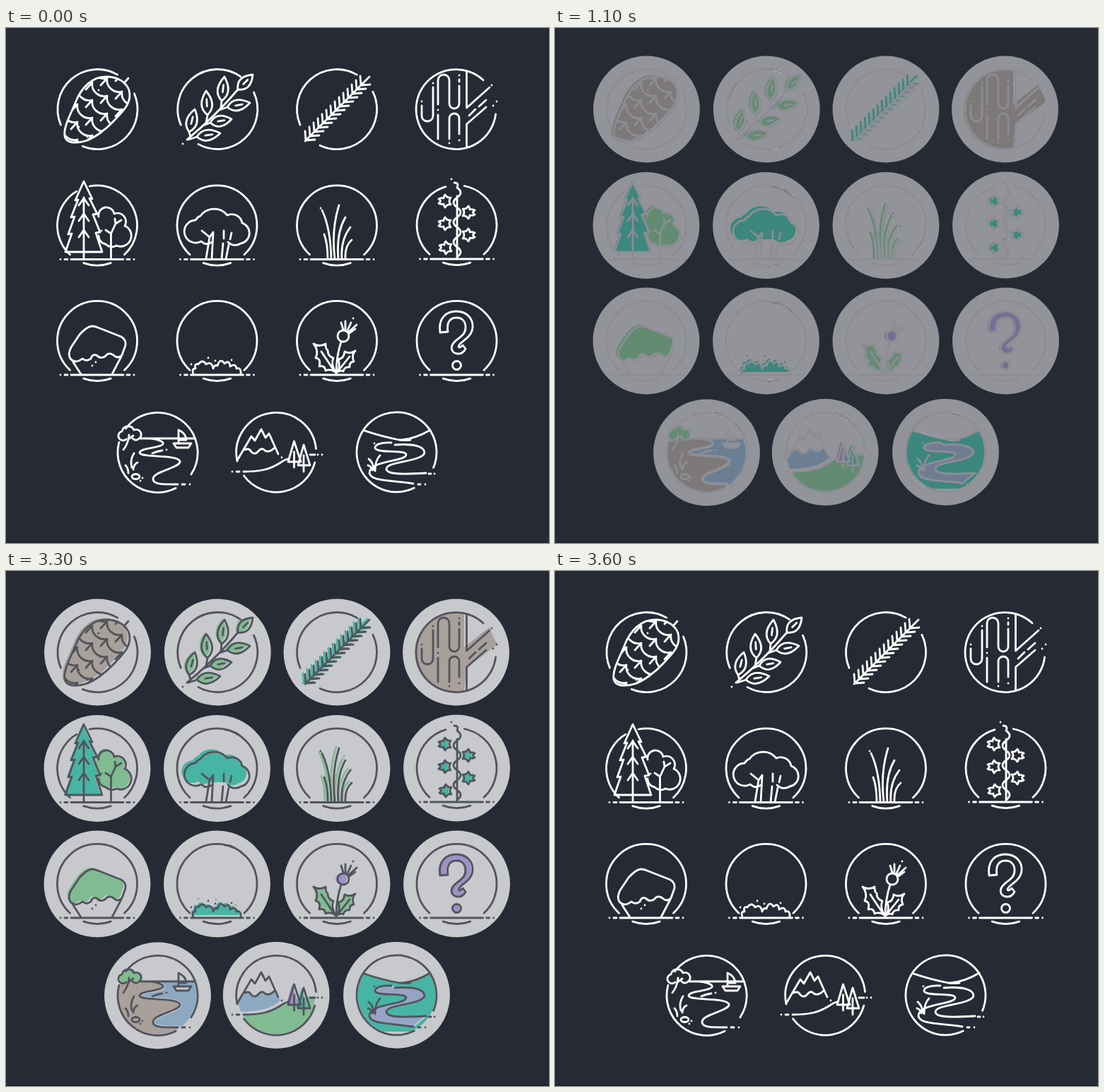
An HTML page that plays this animation: 768x729 px, repeating every 4.6 s.

```html
<!DOCTYPE html>
<html lang="en">
<head>
<meta charset="utf-8">
<title>Nature icons</title>
<style>
html, body { margin: 0; width: 100%; height: 100%; overflow: hidden; background: #262a34; }
svg { display: block; width: 100vw; height: 100vh; }
.ink { fill: none; stroke-width: 2.8; stroke-linecap: round; stroke-linejoin: round; }
</style>
</head>
<body>
<svg id="stage" viewBox="0 0 768 729"></svg>
<script>
const TEAL = '#53e4c8', GREEN = '#a0ecb0', BROWN = '#d4c8bc', PURPLE = '#c8b5f3',
      BLUE = '#b0d3f0', RIVER = '#bccff3', WHITE = '#fff', DARK = '#191b27', NIGHT = '#262a34';
const R = 56.5, DISC = 75.4;

let ink = '', paint = '', discs = '', defs = '';

const line = (d, extra = '') => { ink += `<path d="${d}" ${extra}/>`; };
const fill = (color, d, x = -3, y = -2, extra = '') => {
  paint += `<path fill="${color}" d="${d}" transform="translate(${x} ${y})" ${extra}/>`;
};
const tint = (color, d, x = -4, y = -2) => {
  paint += `<path class="ink" stroke="${color}" d="${d}" transform="translate(${x} ${y})"/>`;
};
const dots = (...points) => points.map(([x, y]) => `M${x} ${y}h0`).join('');
const round = (x, y, r) => `M${x - r} ${y}a${r} ${r} 0 1 1 ${2 * r} 0a${r} ${r} 0 1 1 ${-2 * r} 0Z`;
const clip = (id, d) => {
  defs += `<clipPath id="${id}"><path d="${d}"/></clipPath>`;
  return `clip-path="url(#${id})"`;
};

// A disc with an inner ring made of arcs given in degrees, clockwise from the right.
function badge(x, y, ...arcs) {
  discs += `<circle cx="${x}" cy="${y}" r="${DISC}"/>`;
  const at = a => {
    const t = a * Math.PI / 180;
    return `${(x + R * Math.cos(t)).toFixed(1)} ${(y + R * Math.sin(t)).toFixed(1)}`;
  };
  for (const [a, b] of arcs) line(`M${at(a)}A${R} ${R} 0 ${b - a > 180 ? 1 : 0} 1 ${at(b)}`);
}

function grounded(x, y, ...arcs) {
  badge(x, y, ...(arcs.length ? arcs : [[133, 407]]), [70, 110]);
  line(`M${x - 37} ${y + 48}h74M${x - 46} ${y + 48}h4M${x + 42} ${y + 48}h4` +
    dots([x - 52, y + 48], [x + 52, y + 48]));
}

function cone() {
  badge(129.5, 115, [157, 300], [337, 472]);
  const body = 'M83 153C81 140 92 121 98 106C106 85 122 67 145 69C158 70 170 76 174 88' +
    'C179 106 165 118 153 131C142 143 125 156 112 160C98 164 85 163 83 153Z';
  let scales = '';
  for (let i = -1; i < 6; i++)
    for (let j = -2; j < 5; j++)
      scales += `M${164 - 21 * i} ${90 + 6 * i + 25 * j}l-9 10m9 -10a17 17 0 0 0 21 19`;
  fill(BROWN, body);
  line(body);
  line(scales, clip('cone', body));
  line('M167 78L173 71' + dots([103, 140], [115, 154], [131, 88]));
}

function branch() {
  badge(299.3, 115, [157, 305], [335, 479]);
  const leaves = [[328, 87, 349, 66], [305, 103, 309, 69], [285, 123, 283, 89], [259, 147, 267, 115],
    [313, 112, 345, 106], [289, 134, 319, 129], [270, 154, 303, 149]];
  for (const [x, y, u, v] of leaves) {
    const dx = u - x, dy = v - y, k = 15 / Math.hypot(dx, dy), nx = -dy * k, ny = dx * k;
    const side = s => `${x + dx * .38 + s * nx} ${y + dy * .38 + s * ny}`;
    const leaf = `M${x} ${y}Q${side(1)} ${u} ${v}Q${side(-1)} ${x} ${y}Z`;
    fill(GREEN, leaf, -3, -1);
    line(`${leaf}M${x + dx * .36} ${y + dy * .36}l${dx * .3} ${dy * .3}`);
  }
  line('M256 158C280 138 307 112 328 87M305 103L304 113M285 123L283 134M259 147L261 154' +
    'M313 112L302 116M289 134L279 138M270 154L258 158' + dots([250, 164]));
}

function twig() {
  badge(468, 115, [157, 300], [334, 475]);
  let needles = 'M423 160L514 69';
  for (let i = 0; i < 14; i++)
    needles += `M${424 + 6 * i} ${159 - 6 * i}l-1 -13m1 13l13 -1`;
  tint(TEAL, needles, -3, -1);
  line(needles);
}

function bark() {
  badge(636.5, 115, [7, 313]);
  fill(BROWN, 'M648 60V108L683 80L695 104L651 137L648 171A57 57 0 1 1 648 60Z', 0, 0);
  line('M651.5 61V113L684 84M651.5 168V136L679 112M655 124L664 115M669 111L679 102' +
    'M588 110V124a8 8 0 0 0 16 0V84M611 108V74a8 8 0 0 1 16 0V107a7 7 0 0 0 14 0V82' +
    'M641 73v3M627 157V128a7 7 0 0 1 14 0V150M611 123V157' +
    dots([687, 81], [689, 110], [694, 104], [588, 104], [604, 78], [641, 67], [641, 159], [627, 163], [611, 116]));
}

function trees() {
  grounded(129, 279.5, [133, 239], [259, 407]);
  const fir = 'M110 217L98 244L102 243L92 268L97 267L88 292L93 291L84 317H136L127 290L133 289L123 264L129 263L118 241L122 242Z';
  const crown = 'A11 11 0 0 1 153 263A12 12 0 0 1 168 280A15 15 0 0 1 156 308A12 12 0 0 1 141 306A12 12 0 0 1 131 294';
  fill(GREEN, `M131 267${crown}L123 264Z`, -2, -2);
  fill(TEAL, fir, -2, 0);
  line(`${fir}M131 267${crown}`);
  line('M110 240V327M148.5 327V291L155 277L163 272M155 277L154 270M148.5 291L141 286' + dots([135, 287]));
  for (const y of [241, 263, 286]) line(`M103 ${y + 10}L110 ${y}L117 ${y + 10}`);
}

function bush() {
  grounded(298.5, 279.5);
  const crown = 'M291 303Q284 309 276 302A16 16 0 1 1 268 272A13 13 0 0 1 275 266A24 24 0 0 1 313 265' +
    'A15 15 0 0 1 334 276A15 15 0 0 1 332 305A14 14 0 0 1 314 303';
  fill(TEAL, crown, -4, -4);
  line(crown);
  line('M283 326L288 296L277 287M291 327L293 290M288 296L293 289M308 287V298M307 305L305 327M319 290L317 299M315 307L311 327');
}

function grass() {
  grounded(468, 279.5);
  const blades = 'M447 258Q459 283 460 327M471 251Q460 285 465 327M480 268Q467 290 470 327' +
    'M487 282Q473 300 475 327M489 300Q479 308 480 327M450 292Q455 305 455 327';
  tint(GREEN, blades);
  tint(PURPLE, dots([478, 262], [488, 281]), 0, 0);
  line(blades + dots([445, 255]));
}

function ivy() {
  grounded(637.5, 279, [133, 254], [281, 407]);
  const leaf = (x, y, s) => {
    const p = (u, v) => `${x + s * u} ${y + v}`;
    return `M${p(7, -5)}Q${p(2, -4)} ${p(-1, -9)}Q${p(-3, -7)} ${p(-3, -4)}Q${p(-7, -5)} ${p(-10, -3)}` +
      `Q${p(-5, 0)} ${p(-10, 3)}Q${p(-7, 5)} ${p(-3, 4)}Q${p(-3, 7)} ${p(-1, 9)}` +
      `Q${p(2, 4)} ${p(7, 5)}Q${p(3, 0)} ${p(7, -5)}Z`;
  };
  for (const [x, y, s] of [[622, 245, 1], [653, 261, -1], [622, 277, 1], [653, 293, -1], [623, 311, 1]]) {
    fill(TEAL, leaf(x, y, s), -2, 0);
    line(leaf(x, y, s));
  }
  line('M638 238V326M634 219Q641 219 638 226q10 7 0 14' + 't0 14'.repeat(6) + dots([630, 214]));
}

function rock() {
  grounded(129, 443);
  const moss = 'M91 468Q87 462 92 452L104 434Q114 423 121 422Q126 422 130 424L163 437Q170 441 169 449L164 463' +
    'Q158 469 152 463Q145 458 140 465Q133 469 128 463Q122 461 120 468Q114 473 108 468Q98 476 91 468Z';
  fill(GREEN, moss);
  line(moss);
  line('M95 473L106 490M163 465L150 490' + dots([122, 478], [127, 473]));
}

function shrub() {
  grounded(298.5, 443);
  const hedge = 'M265 490Q262 482 268 482Q266 474 272 476Q278 468 283 476Q291 471 293 482Q295 476 299 478' +
    'Q303 466 309 475Q316 469 317 479Q325 474 326 482Q333 480 332 490';
  fill(TEAL, hedge, -2, -3);
  tint(PURPLE, dots([272, 464], [297, 465], [325, 473]), 0, 0);
  line(hedge + dots([262, 476], [286, 467], [296, 471], [319, 470]));
}

function thistle() {
  grounded(468, 443);
  const left = 'M466 487Q459 476 463 467Q455 465 455 456Q452 455 452 447Q444 452 435 447Q443 457 438 467' +
    'Q446 468 443 479Q451 477 452 485Q459 482 466 487Z';
  const right = 'M469 487Q473 478 470 469Q478 468 479 458Q486 462 494 457Q488 463 492 472Q485 473 486 480' +
    'Q479 479 477 486Q473 484 469 487Z';
  const head = round(477, 436, 8);
  fill(GREEN, left + right, -2, 0);
  fill(PURPLE, head, -3, 0);
  line(left + right + head);
  line('M446 458L464 485M486 465L470 485M474 444Q467 465 467 490' +
    'M477 427L474 417M480 427L480 415M483 428L488 417M485 430L496 420M486 432L494 426' + dots([491, 411]));
}

function question() {
  grounded(637.5, 443);
  const mark = 'M614 431C611 410 623 401 637 401C652 401 661 412 660 424C658 441 640 444 640 451' +
    'Q641 454 646 449L650 454Q646 462 638 461C630 460 628 452 633 446C639 438 650 436 650 424' +
    'C650 415 645 410 637 410C627 410 623 418 625 430Z' + round(637.5, 477.5, 6);
  fill(PURPLE, mark, -2, 0);
  line(mark);
}

function lake() {
  badge(214.5, 601, [217, 393], [63, 195]);
  const inside = clip('lake', round(214.5, 601, 55));
  const shore = 'M190 581C212 580 224 585 222 589C218 595 190 594 189 601C190 609 240 603 246 613' +
    'C248 623 207 627 208 639C209 646 220 646 243 646';
  const crown = 'M170 582A6.5 6.5 0 1 1 164 571A9 9 0 0 1 181 569A6.5 6.5 0 1 1 187 582Q183 585 179 581';
  const hull = 'M237 588H262L258 594H241Z', sail = 'M244 587V569Q254 573 255 583H244';
  fill(BLUE, 'M150 581H275V647H150Z', 0, 0, inside);
  fill(BROWN, shore + 'V670H150V580Z', 0, 0, `${inside} stroke="#fff" stroke-width="5"`);
  fill(BROWN, shore + 'V655H150V580Z', 0, 0, inside);
  fill(GREEN, crown, 2, -1);
  fill(WHITE, hull + sail, 0, 0);
  line(shore + 'M190 581H267' + hull + sail + crown);
  line('M166 597Q173 588 174 576M173 582L180 577M207 602Q214 599 221 598M249 646h4' +
    'M169 619Q173 623 173 630M180 625Q181 617 186 615M181 602Q175 612 178 622' +
    'M178 635a5.5 3.5 0 1 1 11 0a5.5 3.5 0 1 1 -11 0Z' + dots([227, 597], [260, 646], [193, 637], [190, 641]));
}

function mountains() {
  badge(382.2, 600.5, [167, 355], [15, 144]);
  const inside = clip('hills', round(382.2, 600.5, 55));
  const snow = 'M338 597Q344 594 347 600Q352 605 357 599Q362 593 366 598Q372 602 380 594';
  const hill = 'M336 628C362 628 374 624 387 616Q394 611 401 609';
  const firs = ['M407.5 585L399 614H417Z', 'M421 590L413 619H430Z'];
  fill(BLUE, snow + 'L388 608Q372 624 330 624L327 613Z', 0, 0, inside);
  fill(GREEN, hill + 'Q420 602 440 602V665H325V628Z', 0, 0, inside);
  fill(PURPLE, firs[0], -3, 0);
  fill(TEAL, firs[1], -3, 0);
  line('M327 612L347 578L352 584L361 568L367 580L372 574L385 603' + snow + hill + firs.join(''));
  line('M407.5 600V622M421 605V628M326 628h4M430 604h7' + dots([320, 628], [441, 604], [447, 604], [390, 608]));
}

function valley() {
  badge(552.5, 600.3, [64, 383]);
  const inside = clip('valley', round(552.5, 600.3, 55));
  const near = 'M545 587C530 586 522 590 522 594C522 603 566 596 566 604C566 614 513 612 514 630C516 642 545 640 576 645';
  fill(TEAL, 'M490 565L507 570Q530 578 556 583Q580 581 600 569L615 562V652H490Z', 0, 0, inside);
  fill(RIVER, near + 'L594 630C560 632 538 632 538 624C538 613 590 614 592 601C592 592 575 588 550 590Z', 0, 0,
    `${inside} stroke="#fff" stroke-width="2"`);
  line(near + 'M550 590C575 588 592 592 592 601C590 614 538 613 538 624C538 632 560 632 594 630');
  line('M507 570Q530 578 556 583Q564 584 572 583M560 583Q580 581 600 569M583 646h3M598 631h3M513 610Q519 614 520 625' +
    'M522 627Q522 612 529 605M512 619Q517 621 518 626' + dots([521, 588], [593, 646], [606, 631]));
}

[cone, branch, twig, bark, trees, bush, grass, ivy, rock, shrub, thistle, question, lake, mountains, valley]
  .forEach(draw => draw());

document.getElementById('stage').innerHTML = `
  <defs>${defs}</defs>
  <rect width="768" height="729" fill="${NIGHT}"/>
  <rect y="728" width="768" height="1" fill="#1b1f29"/>
  <g class="ink" stroke="${WHITE}">${ink}</g>
  <g id="colour" opacity="0">
    <g fill="${WHITE}">${discs}</g>${paint}
    <g class="ink" stroke="${DARK}">${ink}</g>
  </g>`;

const LOOP = 4600;
const steps = [[0, 0], [1000, .25], [1100, .5], [1200, .75], [1300, 1],
  [3300, .75], [3400, .5], [3500, .25], [3600, 0], [LOOP, 0]];
document.getElementById('colour').animate(
  steps.map(([time, opacity]) => ({ offset: time / LOOP, opacity, easing: 'step-end' })),
  { duration: LOOP, iterations: Infinity });
</script>
</body>
</html>
```
